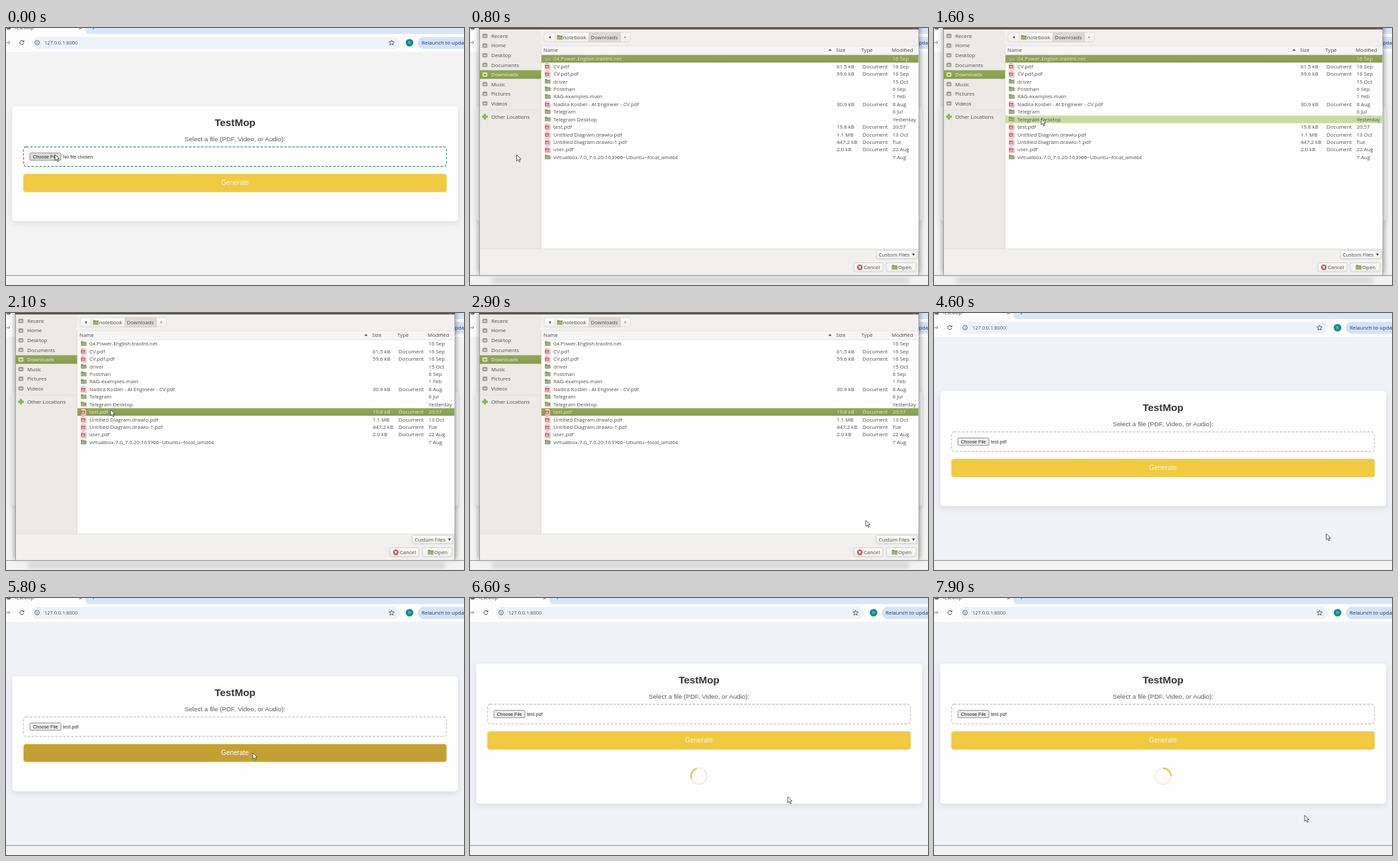
An HTML page that plays this animation: 692x388 px, repeating every 8000 ms.

```html
<!DOCTYPE html>
<html lang="en">
<head>
<meta charset="utf-8">
<title>TestMop</title>
<style>
  html, body { margin: 0; width: 100%; height: 100%; overflow: hidden; background: #f3f3f3; }
  svg { display: block; width: 692px; height: 388px; }
  .ui { font-family: "Open Sans", "Noto Sans", sans-serif; }
  .web { font-family: "Liberation Sans", Arial, sans-serif; }
  .mid { text-anchor: middle; }
  .list { font-size: 7.85px; fill: #4c4c4c; }
</style>
</head>
<body>
<svg viewBox="0 0 692 388" xmlns="http://www.w3.org/2000/svg">
  <defs>
    <filter id="soft" x="-5%" y="-20%" width="110%" height="150%">
      <feDropShadow dx="0" dy="3" stdDeviation="5" flood-color="#000" flood-opacity=".1"/>
    </filter>
    <filter id="blur" x="-10%" y="-50%" width="120%" height="200%"><feGaussianBlur stdDeviation="3"/></filter>
    <linearGradient id="button" x2="0" y2="1">
      <stop stop-color="#fcfcfb"/><stop offset="1" stop-color="#eeedea"/>
    </linearGradient>
    <linearGradient id="green" x2="0" y2="1">
      <stop stop-color="#92a658"/><stop offset="1" stop-color="#889d4c"/>
    </linearGradient>
    <g id="folder">
      <path d="M0 .5h3l1 1h4.500v6h-8.500z" fill="#8a9c68"/>
      <path d="M0 3h8.500v4.500h-8.500z" fill="#9db07a"/>
    </g>
    <g id="pdf">
      <path d="M.8 0h5.200l2 2v7.200h-7.200z" fill="#f3e4e2" stroke="#c99a96" stroke-width=".7"/>
      <rect x=".3" y="2.300" width="6.200" height="5.200" rx=".6" fill="#d65a55"/>
      <path d="M1.700 6.200l1.800-2.600l1.500 2.400z" fill="none" stroke="#fbeeee" stroke-width=".8"/>
    </g>
  </defs>

  <rect id="backdrop" width="692" height="388"/>

  <g id="browser" class="ui">
    <rect width="692" height="36" fill="#fdfdfe"/>
    <path d="M120 0h572v9h-566q-6 0-6-6z" fill="#d9e5f9"/>
    <circle cx="4" cy="-1" r="3.500" fill="#666"/>
    <text x="12" y="2" font-size="7.600" fill="#444">TestMop</text>
    <path d="M110.500-2l4 4m0-4l-4 4M132-3v5" stroke="#555" fill="none"/>
    <path d="M0 22h6m-2.500-2.500l2.500 2.500l-2.500 2.500" stroke="#8a8a8a" fill="none"/>
    <path d="M26.400 20.300a3 3 0 1 0 .4 2.500" stroke="#444" fill="none"/>
    <path d="M27.300 18.500v2.800h-2.800z" fill="#444"/>
    <rect x="39" y="13.500" width="556" height="18" rx="9" fill="#edf1f8"/>
    <circle cx="47" cy="22" r="3.400" fill="none" stroke="#555" stroke-width=".9"/>
    <path d="M47 21.500v2.300M47 19.800v.8" stroke="#555" stroke-width=".9"/>
    <text x="58" y="25" font-size="7.400" fill="#505358">127.0.0.1:8000</text>
    <path d="M582.500 18.300l1.200 2.500l2.700.3l-2 1.900l.5 2.700l-2.400-1.300l-2.400 1.300l.5-2.700l-2-1.900l2.700-.3z" fill="none" stroke="#444" stroke-width=".9"/>
    <circle cx="609.700" cy="22.200" r="5.800" fill="#12908c"/>
    <text x="609.700" y="24" font-size="5" fill="#cfeceb" class="mid">N</text>
    <rect x="622" y="13.500" width="90" height="18" rx="9" fill="#d3e2fc"/>
    <text x="628" y="25" font-size="7.850" font-weight="500" fill="#27364f">Relaunch to update</text>
  </g>

  <g id="page" class="web">
    <rect id="card" x="9.500" y="118" width="673.500" height="173.500" rx="5" fill="#fefefe" filter="url(#soft)"/>
    <g id="form">
      <text x="346" y="147.500" font-size="15.300" font-weight="bold" fill="#333" class="mid">TestMop</text>
      <text x="346" y="170.700" font-size="9.750" fill="#5c5c5c" class="mid">Select a file (PDF, Video, or Audio):</text>
      <rect id="drop" x="26.500" y="179.500" width="639" height="29.500" rx="4" fill="none" stroke-width="1.300" stroke-dasharray="3.800 2.200"/>
      <rect id="choose" x="36" y="188.700" width="47" height="11" rx="1.500" stroke="#808080" stroke-width=".9"/>
      <text x="59.500" y="196.800" font-size="7.150" fill="#222" class="mid">Choose File</text>
      <text id="chosen" x="86" y="196.800" font-size="7.150" fill="#333"></text>
      <rect id="submit" x="26.300" y="220.500" width="639.500" height="27" rx="3.500" stroke="#eed676"/>
      <text id="submitText" x="346" y="237.300" font-size="10.050" fill="#fff" class="mid">Generate</text>
    </g>
    <g id="spinner" fill="none" stroke-width="2.300">
      <circle cx="346" cy="269" r="12" stroke="#f1efe6"/>
      <path d="M337.500 260.500a12 12 0 0 1 17 0" stroke="#e8c53c"/>
    </g>
  </g>

  <rect y="374" width="692" height="14" fill="#f2f2f3"/>
  <rect y="373" width="692" height="1.200" fill="#98989a"/>

  <g id="dialog" class="ui list">
    <rect x="12" y="-10" width="669" height="381" fill="#000" opacity=".3" filter="url(#blur)"/>
    <rect x="33" y="377" width="630" height="8" fill="#777" opacity=".25" filter="url(#blur)"/>
    <rect x="14.500" y="-5" width="663.500" height="378.500" fill="#f1f0ee" stroke="#9a9a99" stroke-width=".9"/>
    <rect x="14" width="664" height="2.200" fill="#57504c"/>
    <rect x="669" width="5" height="1.800" fill="#c64b35"/>
    <rect x="15" y="3" width="92.500" height="330" fill="#ebeae7"/>
    <path d="M107.500 27v306M15 333.500h663" stroke="#dcdad6" stroke-width=".8"/>
    <rect x="108" y="27" width="569.500" height="306" fill="#fff"/>
    <rect x="108" y="27" width="569.500" height="13.500" fill="#f6f5f4"/>
    <path d="M108 27h569.500M108 40.500h569.500" stroke="#dfddd9" stroke-width=".7"/>

    <rect x="112" y="7" width="130" height="14" rx="2.500" fill="url(#button)" stroke="#d6d4d0" stroke-width=".8"/>
    <rect x="179.500" y="7" width="48" height="14" fill="#dcdad7" stroke="#cbc9c5" stroke-width=".7"/>
    <path d="M128.500 7v14" stroke="#d6d4d0" stroke-width=".7"/>
    <path d="M122 11.700v4.600l-3.200-2.300z" fill="#555"/>
    <path d="M233.500 12.200v3.600l2.600-1.800z" fill="#888"/>
    <use href="#folder" x="131.500" y="10"/>
    <text x="140.500" y="17">notebook</text>
    <text x="182.500" y="17">Downloads</text>

    <text x="111" y="35.800">Name</text>
    <text x="553" y="35.800">Size</text>
    <text x="591" y="35.800">Type</text>
    <text x="637" y="35.800">Modified</text>
    <path d="M541.300 34.600l2.600-3.200l2.600 3.200z" fill="#555"/>
    <g id="places"></g>
    <g id="files"></g>

    <g stroke="#c6c4c0" stroke-width=".8">
      <rect x="614" y="335.500" width="62" height="13" rx="2.500" fill="url(#button)"/>
      <rect x="580" y="354.500" width="44" height="13.500" rx="2.500" fill="url(#button)"/>
      <rect id="open" x="629" y="354.500" width="45" height="13.500" rx="2.500" fill="url(#button)"/>
    </g>
    <text x="617.500" y="344.800">Custom Files</text>
    <path d="M667.500 340.500h5l-2.500 3.500z" fill="#555"/>
    <circle cx="589" cy="361.200" r="4.200" fill="#d4504a"/>
    <path d="M587.300 359.500l3.400 3.400m0-3.400l-3.400 3.400" stroke="#fff" stroke-width="1.100"/>
    <text x="595" y="364">Cancel</text>
    <use href="#folder" x="637.500" y="357"/>
    <text x="647" y="364">Open</text>
  </g>

  <path id="cursor" d="M0 0v9.200l2.200-2l1.500 3.500l1.600-.7l-1.500-3.400h2.900z" fill="#fff" stroke="#444" stroke-width=".9"/>
</svg>

<script>
const LOOP = 8000;
const DIALOG_OPENS = 300, FILE_PICKED = 2000, OPEN_PRESSED = 3800, DIALOG_CLOSES = 4400, LOADING = 6000;
const ROW_TOP = 40.8, ROW_HEIGHT = 11.43;

const $ = id => document.getElementById(id);
const set = (node, attrs) => {
  for (const key in attrs) node.setAttribute(key, attrs[key]);
};
const add = (parent, tag, attrs, text = '') => {
  const node = document.createElementNS('http://www.w3.org/2000/svg', tag);
  set(node, attrs);
  node.textContent = text;
  return parent.appendChild(node);
};
const show = (id, on) => set($(id), { display: on ? 'inline' : 'none' });

const files = [
  '04.Power.English.traidnt.net||16 Sep',
  'CV.pdf|61.5 kB|16 Sep',
  'CV.pdf.pdf|59.6 kB|16 Sep',
  'driver||15 Oct',
  'Postman||6 Sep',
  'RAG-examples-main||1 Feb',
  'Nadira Kosbel - AI Engineer - CV.pdf|30.9 kB|8 Aug',
  'Telegram||6 Jul',
  'Telegram Desktop||Yesterday',
  'test.pdf|19.8 kB|20:57',
  'Untitled Diagram.drawio.pdf|1.1 MB|13 Oct',
  'Untitled Diagram.drawio-1.pdf|447.2 kB|Tue',
  'user.pdf|2.0 kB|22 Aug',
  'virtualbox-7.0_7.0.20-163906~Ubuntu~focal_amd64||7 Aug'
];
const TEST_FILE = 9;

const rows = files.map((line, i) => {
  const [name, size, date] = line.split('|');
  const y = ROW_TOP + i * ROW_HEIGHT;
  const group = add($('files'), 'g', {});
  const bar = add(group, 'rect', { x: 108, y, width: 569.5, height: ROW_HEIGHT });
  add(group, 'use', { href: size ? '#pdf' : '#folder', x: 113, y: y + 1.3 });
  const cells = [[126, name], [554, size], [593, size && 'Document'], [638.5, date]];
  cells.forEach(([x, text]) => add(group, 'text', { x, y: y + 8.5 }, text));
  return { group, bar };
});

['Recent', 'Home', 'Desktop', 'Documents', 'Downloads', 'Music', 'Pictures', 'Videos'].forEach((name, i) => {
  const y = 12 + i * 14.55, active = name === 'Downloads';
  if (active) add($('places'), 'rect', { x: 15, y: y - 6.5, width: 92.5, height: 13, fill: 'url(#green)' });
  add($('places'), 'rect', { x: 18.8, y: y - 3.2, width: 7.4, height: 6.4, rx: 1.5, fill: active ? '#dfe8c4' : '#969691' });
  add($('places'), 'rect', { x: 20.5, y: y - 1, width: 4, height: 2.6, fill: active ? '#8fa356' : '#d5d5d0' });
  add($('places'), 'text', { x: 32, y: y + 2.9, fill: active ? '#f1f4e6' : '#4c4c4c' }, name);
});
add($('places'), 'path', { d: 'M15 124h92', stroke: '#dcdad6', 'stroke-width': .7 });
add($('places'), 'path', { d: 'M22.500 129.700v8.600M18.200 134h8.600', stroke: '#8db455', 'stroke-width': 3.4 });
add($('places'), 'text', { x: 32, y: 137 }, 'Other Locations');

// time, x, y of the pointer
const path = [
  [0, 74, 191], [100, 74, 191], [300, 70.5, 191.500], [900, 70.5, 191.500],
  [1400, 162, 137], [1600, 162, 137], [1900, 158, 146], [2300, 158, 146],
  [2600, 462, 238], [2700, 462, 238], [2900, 598, 313], [3600, 648, 358], [4400, 648, 358],
  [5100, 371, 234], [5400, 373, 234], [5900, 373, 234],
  [6600, 480, 300], [7500, 555, 314], [7700, 560, 328], [LOOP, 560, 328]
];
function pointerAt(t) {
  const i = path.findIndex(point => point[0] > t);
  const [t0, x0, y0] = path[i - 1], [t1, x1, y1] = path[i];
  const u = (t - t0) / (t1 - t0), k = u * u * (3 - 2 * u);
  return [x0 + (x1 - x0) * k, y0 + (y1 - y0) * k];
}

function render(t) {
  const [x, y] = pointerAt(t);
  const picking = t >= DIALOG_OPENS && t < DIALOG_CLOSES;
  const done = t >= DIALOG_CLOSES, loading = t >= LOADING;
  const lift = loading ? 19 : 0;
  const over = (top, bottom) => !picking && x > 26 && x < 666 && y + lift > top && y + lift < bottom;

  set($('cursor'), { transform: `translate(${x} ${y})` });
  set($('backdrop'), { fill: done ? '#f1f2f5' : '#f3f3f3' });
  show('dialog', picking);

  set($('card'), { y: 118 - lift, height: loading ? 211.5 : 173.5 });
  set($('form'), { transform: `translate(0 ${-lift})` });
  set($('drop'), { stroke: over(179, 209) ? '#4d9a9c' : '#c9c9c5' });
  set($('choose'), { fill: over(188, 200) ? '#dedede' : '#efefef' });
  $('chosen').textContent = done ? 'test.pdf' : 'No file chosen';
  const hot = over(220, 248);
  set($('submit'), { fill: hot ? '#c4a034' : '#f1ca42' });
  set($('submitText'), { opacity: hot ? 1 : .8 });
  show('spinner', loading);
  set($('spinner'), { transform: `rotate(${(t - 7900) * .36 + 45} 346 269)` });

  const selected = t < FILE_PICKED ? 0 : TEST_FILE;
  const hovered = x > 108 && x < 678 ? Math.floor((y - ROW_TOP) / ROW_HEIGHT) : -1;
  rows.forEach(({ group, bar }, i) => {
    set(group, { fill: i === selected ? '#e3e9d0' : '#4c4c4c' });
    set(bar, { fill: i === selected ? 'url(#green)' : i === hovered ? '#c9dba3' : 'none' });
  });
  const pressed = t >= OPEN_PRESSED;
  set($('open'), { fill: pressed ? '#dddcd5' : 'url(#button)', stroke: pressed ? '#98988e' : '#c6c4c0' });
}

function tick() {
  render(performance.now() % LOOP);
  requestAnimationFrame(tick);
}
tick();
</script>
</body>
</html>
```
